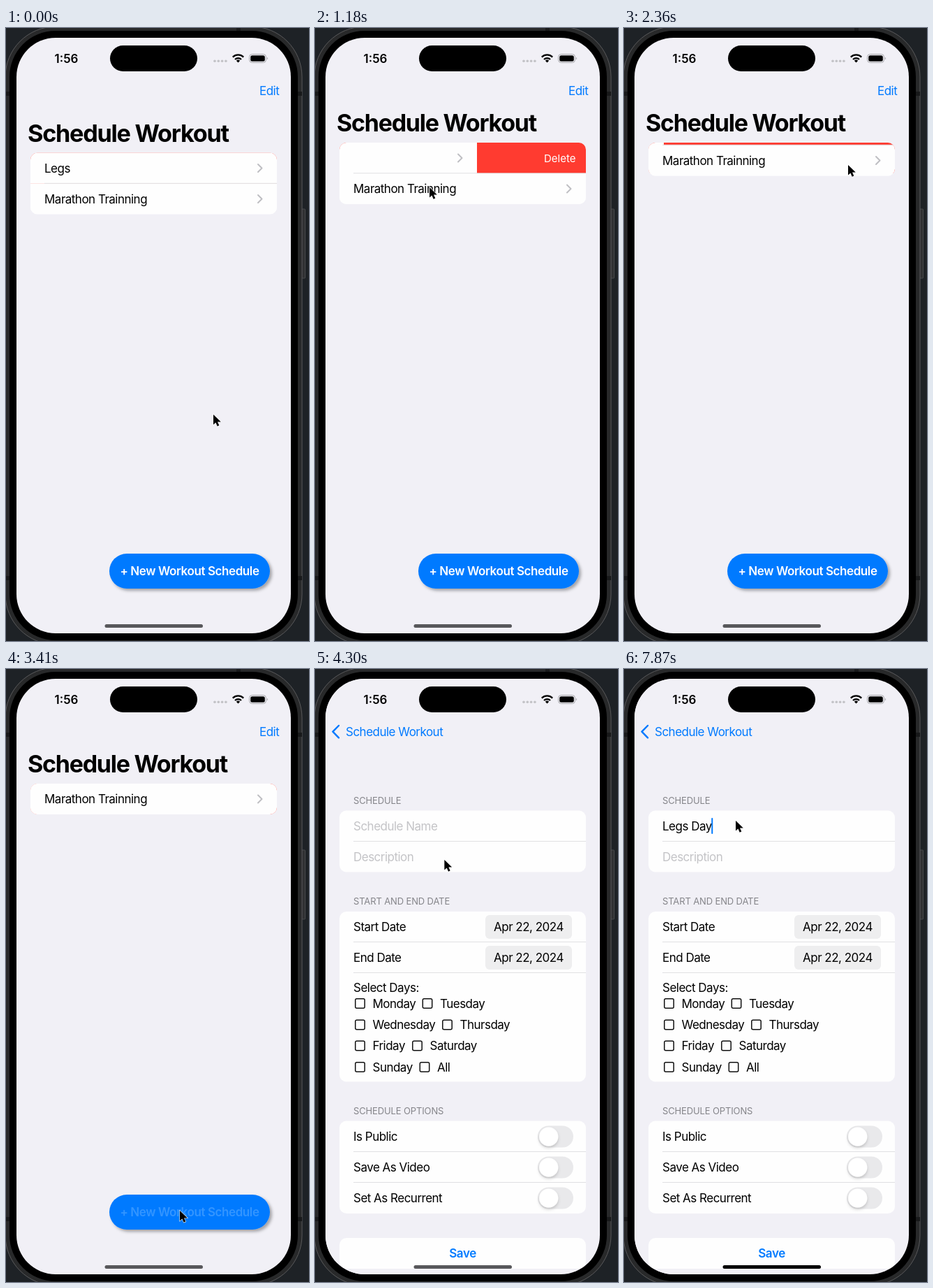
Write an HTML page that moves like this. It is 434 by 877 pixels and loops after 8 s.

```html
<!DOCTYPE html>
<html lang="en">
<head>
<meta charset="utf-8">
<title>Schedule Workout</title>
<style>
  html, body { margin: 0; height: 100%; overflow: hidden; background: #1e2226; }
  svg { display: block; }
  text { font: 17px Inter, sans-serif; font-optical-sizing: none; letter-spacing: -.03em; white-space: pre; }
  .title { font-size: 34px; font-weight: 700; letter-spacing: -.037em; }
  .semi { font-weight: 600; letter-spacing: -.024em; }
  .header { font-size: 13px; letter-spacing: -.01em; fill: #85858a; }
  .small { font-size: 15px; letter-spacing: 0; }
  .blue { fill: #007aff; }
  .hint { fill: #c4c4c7; }
  .mid { text-anchor: middle; }
  .line { fill: none; stroke-linecap: round; stroke-linejoin: round; }
</style>
</head>
<body>
<script>
const BG = '#f1f0f6', WHITE = '#fefefe', BLUE = '#007aff';

const rect = (x, y, w, h, r, fill, more = '') =>
  `<rect x="${x}" y="${y}" width="${w}" height="${h}" rx="${r}" fill="${fill}" ${more}/>`;
const text = (x, y, str, cls = '', more = '') => `<text x="${x}" y="${y}" class="${cls}" ${more}>${str}</text>`;
const group = (id, body, more = '') => `<g id="${id}" ${more}>${body}</g>`;
const line = (d, color, width) => `<path class="line" d="${d}" stroke="${color}" stroke-width="${width}"/>`;
const separator = y => rect(55, y, 333, 1, 0, '#e0e0e3');
const card = (y, h) => rect(35, y, 353, h, 10, WHITE);
const listRow = label => text(55, 28, label) + line('M361 16.5l5.5 5.5-5.5 5.5', '#bfbfc3', 2);

const dateRow = (y, label) =>
  text(55, y + 6, label) + rect(244, y - 17, 124, 34, 6, '#eeeeef') + text(306, y + 6, 'Apr 22, 2024', 'mid');
const day = (x, y, label) =>
  rect(x + .8, y - 6.7, 13.4, 13.4, 2, 'none', 'stroke="#111" stroke-width="1.5"') + text(x + 25.5, y + 6, label);
const toggleRow = (y, label) => text(55, y + 6, label) + rect(319, y - 15.5, 51, 31, 15.5, '#e9e9eb') +
  `<circle cx="334.7" cy="${y}" r="13.6" fill="#fff" filter="url(#knobShadow)"/>`;

const device =
  rect(423, 259, 5.5, 99, 1, '#303133', 'stroke="#505254" stroke-width=".8"') +
  rect(-1, -2, 425, 884, 72, '#28292a', 'stroke="#59595b"') +
  [[-1, 91], [-1, 784], [418, 91], [418, 784]].map(([x, y]) => rect(x, y, 6, 6, 0, '#18191a')).join('') +
  rect(330, -1, 6, 5, 0, '#18191a') +
  rect(5, 4, 413, 872, 66, '#000');

const listPage = rect(15, 14, 393, 852, 0, BG) +
  group('list',
    rect(35, 164, 353, 88, 0, WHITE) +
    `<g transform="translate(0 164)">` +
      rect(35, 0, 353, 44, 0, '#ff3b30') + text(328, 27.5, 'Delete', 'small', 'fill="#fff"') +
      group('swiped', rect(35, 0, 353, 44, 0, WHITE) + listRow('Legs')) +
    `</g>` +
    group('secondRow', rect(35, 0, 353, 44, 0, WHITE) + listRow('Marathon Trainning') +
      group('divider', separator(-.7))),
    'clip-path="url(#listClip)"') +
  rect(148, 752, 230, 50, 25, BLUE, 'filter="url(#buttonShadow)"') +
  text(263, 783, '+ New Workout Schedule', 'semi mid', 'id="buttonLabel" fill="#fff"');

const formPage = rect(15, 14, 393, 852, 0, BG) +
  text(55, 193, 'SCHEDULE', 'header') + card(202.5, 88) + separator(246) +
  text(55, 231, 'Schedule Name', 'hint', 'id="nameHint"') + text(55, 231, '', '', 'id="name"') +
  text(55, 275, 'Description', 'hint') +
  rect(55, 213, 2, 23, 1, BLUE, 'id="caret"') +
  text(55, 337, 'START AND END DATE', 'header') + card(347, 243.5) + separator(390) + separator(434) +
  dateRow(369, 'Start Date') + dateRow(413, 'End Date') + text(55, 462, 'Select Days:') +
  day(57, 478.5, 'Monday') + day(153.5, 478.5, 'Tuesday') +
  day(57, 509, 'Wednesday') + day(182, 509, 'Thursday') +
  day(57, 539, 'Friday') + day(139, 539, 'Saturday') +
  day(57, 569.5, 'Sunday') + day(149.5, 569.5, 'All') +
  text(55, 637, 'SCHEDULE OPTIONS', 'header') + card(646.5, 132.5) + separator(690) + separator(734) +
  toggleRow(669, 'Is Public') + toggleRow(713, 'Save As Video') + toggleRow(757, 'Set As Recurrent') +
  card(814, 44) + text(211.5, 842, 'Save', 'semi mid blue');

const navigation =
  group('title', text(0, 0, 'Schedule Workout', 'title')) +
  group('back', text(0, 0, 'Schedule Workout', 'blue')) +
  group('backArrow', line('M34 81l-8.5 8.7 8.5 8.7', BLUE, 2.5)) +
  text(363, 96, 'Edit', 'blue', 'id="edit"');

const statusBar = text(86.5, 49.5, '1:56', 'semi mid', 'style="letter-spacing:0"') +
  rect(149, 25, 125, 37, 18.5, '#000') +
  [299, 304.3, 309.6, 314.9].map(x => `<circle cx="${x}" cy="47.3" r="1.8" fill="#c2c2c6"/>`).join('') +
  `<path d="M332.5 49.5l-2.7-2.8a3.9 3.9 0 0 1 5.4 0z"/>` +
  `<path fill="none" stroke="#000" stroke-width="2.3" d="M328 45a6.4 6.4 0 0 1 9 0M324.8 41.6a11 11 0 0 1 15.4 0"/>` +
  rect(348.5, 37.5, 24, 12, 4, 'none', 'stroke="#a5a5a9"') + rect(350.2, 39.2, 20.6, 8.6, 2.5, '#000') +
  `<path d="M374 41.5q2.2 2 0 4z" fill="#a5a5a9"/>`;

document.body.innerHTML = `<svg width="434" height="877" viewBox="0 0 434 877">
  <defs>
    <clipPath id="screenClip">${rect(15, 14, 393, 852, 56, '#000')}</clipPath>
    <clipPath id="listClip">${rect(35, 164, 353, 88, 10, '#000', 'id="listShape"')}</clipPath>
    <filter id="buttonShadow" x="-10%" y="-30%" width="120%" height="160%">
      <feDropShadow dx="3" dy="3" stdDeviation="2" flood-opacity=".33"/></filter>
    <filter id="knobShadow" x="-30%" y="-30%" width="160%" height="170%">
      <feDropShadow dx="0" dy="2.5" stdDeviation="2" flood-opacity=".18"/></filter>
  </defs>
  ${device}
  <g clip-path="url(#screenClip)">
    ${group('listPage', listPage)}
    ${rect(15, 14, 393, 852, 0, '#000', 'id="dim"')}
    ${group('formPage', formPage)}
    ${navigation}${statusBar}
    ${rect(141.5, 853, 140.5, 5, 2.5, '#000', 'id="homeBar"')}
  </g>
  <path id="cursor" d="M0 0v14.6l3.4-3.1 2.3 5.2 2.6-1.1-2.3-5.1h4.8z" stroke="#fff" stroke-width="1.1"
    style="paint-order:stroke"/>
</svg>`;

const el = Object.fromEntries([...document.querySelectorAll('[id]')].map(node => [node.id, node]));
const set = (node, attrs) => Object.entries(attrs).forEach(([key, value]) => node.setAttribute(key, value));
const move = (node, x, y, scale = 1) => set(node, { transform: `translate(${x} ${y}) scale(${scale})` });

// The picture advances in ticks of about 148 ms; all keys are [tick, ...values].
const TICK = 148.2, LOOP = 8000;
const cursorKeys = [[0, 297, 553], [1, 301, 480], [3, 316, 270], [5, 320, 196], [6, 320, 196], [7, 238, 210],
  [8, 164, 228], [9, 166, 227], [11, 245, 212], [13, 319, 197], [14, 321, 196], [16, 321, 196], [17, 312, 330],
  [18, 270, 650], [19, 249, 775], [24, 249, 775], [25, 237, 640], [26, 208, 425], [28, 188, 290],
  [31, 180, 239], [36, 180, 239], [38, 160, 217]];
const pullKeys = [[0, 14.5], [1, 8], [2, 4], [3, 2], [5, 0]];
const swipeKeys = [[6, 0], [7, -75], [8, -156], [9, -140], [10, -85], [11, -75], [14, -75], [15, -250], [16, -331]];
const heightKeys = [[14, 44], [15, 22], [16, 3.5], [17, 0]];
const pushKeys = [[24, 0], [25, .55], [26, .949], [27, .995], [28, 1]];
const typedKeys = [[46, 'L'], [47, 'Le'], [48, 'Leg'], [49, 'Legs'], [51, 'Legs '], [52, 'Legs Da'], [53, 'Legs Day']];

function at(keys, tick) {
  const next = keys.findIndex(key => key[0] > tick);
  if (next === 0) return keys[0].slice(1);
  if (next < 0) return keys.at(-1).slice(1);
  const a = keys[next - 1], b = keys[next], u = (tick - a[0]) / (b[0] - a[0]);
  return a.slice(1).map((v, i) => v + (b[i + 1] - v) * u);
}

function draw(tick) {
  const [pull] = at(pullKeys, tick), [swipe] = at(swipeKeys, tick);
  const [height] = at(heightKeys, tick), [push] = at(pushKeys, tick);
  const rest = 1 - push;

  move(el.cursor, ...at(cursorKeys, tick));
  move(el.list, 0, pull);
  move(el.swiped, swipe, 0);
  move(el.secondRow, 0, 164 + height);
  set(el.listShape, { height: 44 + height });
  set(el.divider, { opacity: height ? 1 : 0 });
  set(el.buttonLabel, { opacity: tick === 23 || tick === 24 ? .2 : 1 });

  move(el.listPage, -118 * push, 0);
  set(el.dim, { opacity: .1 * push });
  move(el.formPage, 393 * rest, 0);
  move(el.title, 31 + 13 * push, 148 + pull - 52 * push, (1 + pull * .0005) * (1 - push / 2));
  set(el.title, { opacity: Math.max(0, 1 - push * 1.06) });
  move(el.back, 44 - 13 * rest, 96 + 52 * rest, 1 + rest);
  set(el.back, { opacity: push });
  move(el.backArrow, 80 * rest, 2 * rest);
  set(el.backArrow, { opacity: Math.max(0, 1 - 7 * rest) });
  set(el.edit, { opacity: push > .9 ? rest / 2 : rest });

  const typed = typedKeys.findLast(key => key[0] <= tick)?.[1] ?? '';
  el.name.textContent = typed;
  set(el.nameHint, { opacity: typed ? 0 : 1 });
  set(el.caret, { opacity: tick >= 40 ? 1 : 0, x: typed ? 54.5 + el.name.getComputedTextLength() : 55 });
  set(el.homeBar, { fill: tick >= 40 ? '#000' : '#58585b' });
}

function loop() {
  draw(Math.floor((performance.now() % LOOP + 15) / TICK));
  requestAnimationFrame(loop);
}
loop();
</script>
</body>
</html>
```
